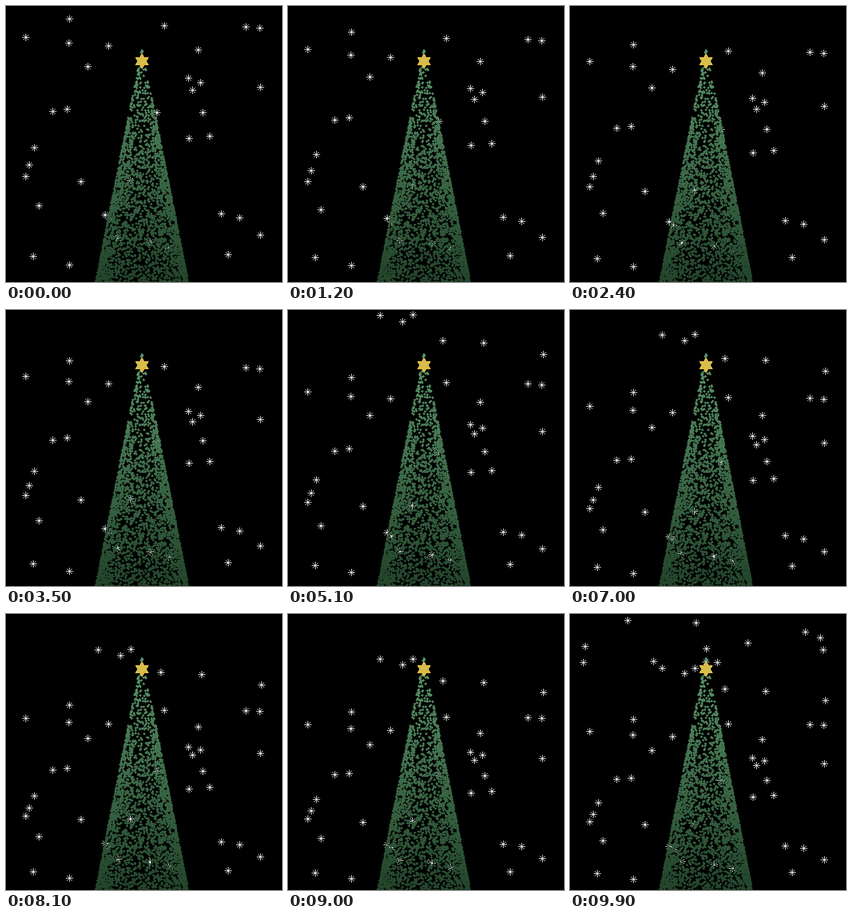
An HTML page for the animation above (10000 ms loop, 480 by 480 pixels).

```html
<!DOCTYPE html>
<html lang="en">
<head>
<meta charset="utf-8">
<title>Snowy tree</title>
<style>
  html, body { margin: 0; width: 100%; height: 100%; overflow: hidden; background: #000; }
  svg { display: block; width: 100vw; height: 100vh; }
</style>
</head>
<body>
<svg viewBox="0 0 480 480" shape-rendering="crispEdges">
  <defs>
    <linearGradient id="needles" gradientUnits="userSpaceOnUse" x1="0" y1="76" x2="0" y2="480">
      <stop offset="0" stop-color="#5a9469"/>
      <stop offset="1" stop-color="#22442a"/>
    </linearGradient>
  </defs>
  <rect width="480" height="480"/>
  <path id="snow" fill="none" stroke="#fff"/>
  <path id="tree" fill="none" stroke="url(#needles)" stroke-width="4.4" stroke-linecap="round"/>
  <path id="topper" fill="#d9bd48"/>
</svg>
<script>
const LOOP = 10000, STEP = 100, GROUND = 480;
const SECOND = 4900, THIRD = 9900;   // times at which more flakes join
const FIRST_RATE = 0.0000411, LATER_RATE = 0.0000375;

const firstFlakes = [
  [110, 22], [34, 54], [109, 64], [178, 69], [142, 105], [275, 34],
  [417, 36], [441, 38], [334, 76], [317, 125], [338, 133], [324, 146],
  [442, 141], [81, 183], [106, 179], [262, 185], [342, 185], [318, 230],
  [354, 226], [49, 246], [40, 276], [34, 296], [130, 305], [216, 303],
  [57, 347], [172, 363], [180, 370], [194, 403], [250, 410], [282, 421],
  [374, 361], [406, 368], [442, 398], [386, 432], [47, 435], [110, 450]
];
const secondFlakes = [
  [160, 5.4], [199, 16.4], [217, 4.4], [269, 49.8], [340, 53.8], [444, 74]
];
const thirdFlakes = [
  [100, 11], [219, 15], [26, 56], [23, 84], [145, 82], [237, 60],
  [256, 84], [309, 50], [409, 31], [435, 41], [440, 62], [236, 83]
];

const setPath = (id, d) => document.getElementById(id).setAttribute("d", d);

function seededRandom(seed) {
  return () => (seed = (seed * 16807) % 2147483647) / 2147483647;
}

// Dots on the surface of a cone, denser towards its foot and its sides.
function treePath() {
  const random = seededRandom(2412);
  const top = 74, height = 408;
  let d = "M236.5 77.5h.01M235.5 81.5h.01M237.5 79.5h.01M230.5 112.5h.01";
  for (let i = 0; i < 2950; i++) {
    const drop = height * random() ** (1 / 2.4);
    const x = 236.5 + 0.197 * drop * Math.sin(2 * Math.PI * random());
    d += `M${Math.floor(x) + 0.5} ${Math.floor(top + drop) + 0.5}h.01`;
  }
  return d;
}

function starPath(cx, cy, r) {
  const corner = deg => {
    const a = deg * Math.PI / 180;
    return `${cx + r * Math.sin(a)} ${cy - r * Math.cos(a)}`;
  };
  const triangle = deg => `M${corner(deg)}L${corner(deg + 120)}L${corner(deg + 240)}Z`;
  return triangle(0) + triangle(180);
}

function flakePath(x, y) {
  const at = `M${Math.round(x) + 0.5} ${Math.round(y) + 0.5}`;
  return `${at}m-6.5 0h13${at}m0-6.5v13${at}m-4.5-4.5l9 9${at}m-4.5 4.5l9-9`;
}

// Every flake closes the same share of its distance to the ground.
function fall(flakes, left) {
  return flakes.map(([x, y]) => flakePath(x, GROUND - (GROUND - y) * left)).join("");
}

function draw(time) {
  const t = Math.floor(time % LOOP / STEP) * STEP;
  const firstLeft = 1 - FIRST_RATE * Math.min(t, SECOND);
  const laterLeft = 1 - LATER_RATE * Math.max(0, t - SECOND);
  let d = fall(firstFlakes, firstLeft * laterLeft);
  if (t >= SECOND) d += fall(secondFlakes, laterLeft);
  if (t >= THIRD) d += fall(thirdFlakes, 1);
  setPath("snow", d);
}

setPath("tree", treePath());
setPath("topper", starPath(236.5, 96, 14));

const start = performance.now();
function tick() {
  draw(performance.now() - start);
  requestAnimationFrame(tick);
}
tick();
</script>
</body>
</html>
```
